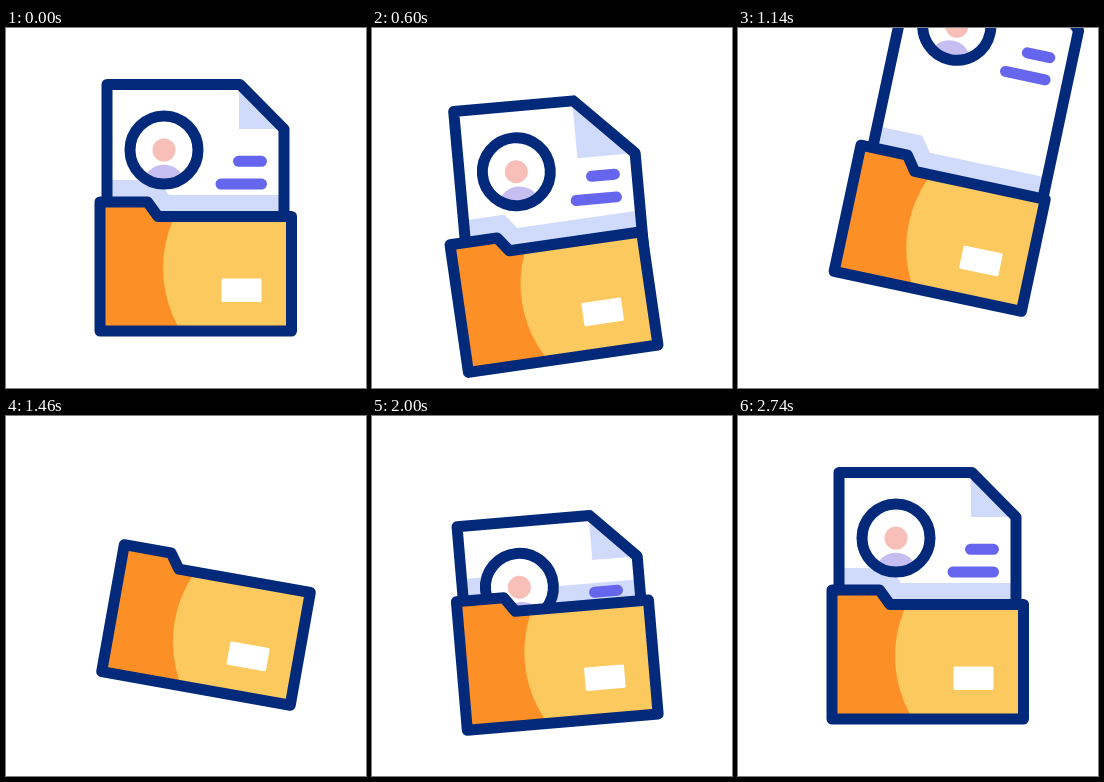
These frames come from a looping animation (360 by 360 pixels, 3 s). An HTML page:

```html
<!DOCTYPE html>
<html lang="en">
<head>
<meta charset="utf-8">
<title>Profile folder</title>
<style>
  html, body { margin: 0; width: 100%; height: 100%; overflow: hidden; background: #fff; }
  svg { display: block; width: 100vw; height: 100vh; }

  .ink { fill: none; stroke: #03297a; stroke-width: 11; stroke-linejoin: round; }
  .tint { fill: #d0dafb; }
  .line { stroke: #6665ee; stroke-width: 11; stroke-linecap: round; }

  .folder, .paper { transform-origin: 189.5px 303px; }
  .folder { animation: bob 3s infinite ease-in-out, tilt 3s infinite ease-in-out; }
  .paper { animation: slide 3s infinite ease-in-out, sway 3s infinite ease-in-out; }
  .sheet { animation: sheet 3s infinite ease-in-out; }
  .paper.sheet {
    animation: slide 3s infinite ease-in-out, sway 3s infinite ease-in-out, sheet 3s infinite ease-in-out;
  }
  .fold { animation: fold 3s infinite ease-in-out; }

  /* The folder dips, tosses the sheet out, then settles. */
  @keyframes bob {
    0%, 7.333% { translate: 0 0; }
    21.667% { translate: 1.5px 28.5px; }
    38.833% { translate: 0 -40px; }
    69.667% { translate: 1px 4px; }
    81.667%, 100% { translate: 0 0; }
  }
  @keyframes tilt {
    0%, 7.333% { rotate: 0deg; }
    24% { rotate: -9.3deg; }
    37.333% { rotate: 12deg; }
    43.333% { rotate: 12.8deg; }
    63.333% { rotate: -5.3deg; }
    80%, 100% { rotate: 0deg; }
  }

  /* The sheet moves relative to the folder. */
  @keyframes slide {
    0%, 7.333% { translate: 0 0; }
    21.333% { translate: 2.3px -9.5px; }
    31% { translate: 6.5px 10px; animation-timing-function: ease-in; }
    47.667% { translate: 0 -390px; animation-timing-function: step-start; }
    47.7% { translate: 0 140px; }
    59.167% { translate: 0 140px; animation-timing-function: ease-out; }
    77.333% { translate: 0 -25px; }
    91.333%, 100% { translate: 0 0; }
  }
  @keyframes sway {
    0%, 7.333% { rotate: 0deg; }
    20.667% { rotate: 3.1deg; }
    31.333% { rotate: -2.6deg; }
    38%, 100% { rotate: 0deg; }
  }
  @keyframes sheet {
    0%, 7.333%, 38.333%, 100% { d: path("M101 56.5H234L278 101V290H101Z"); }
    20.667% { d: path("M101 56.5H221L278 114V290H101Z"); }
    30.667% { d: path("M101 56.5H226L278 109V290H101Z"); }
  }
  @keyframes fold {
    0%, 7.333%, 38.333%, 100% { d: path("M233 56.5V101H278Z"); }
    20.667% { d: path("M220 56.5V114H278Z"); }
    30.667% { d: path("M225 56.5V109H278Z"); }
  }
</style>
</head>
<body>
<svg viewBox="0 0 360 360">
  <defs>
    <path id="case" d="M94 174H141.5L152 188.5H285.5V303H94Z"/>
    <clipPath id="front"><use href="#case"/></clipPath>
    <clipPath id="pocket"><path d="M-400 -700H800V300H-400Z"/></clipPath>
    <clipPath id="page"><path class="paper sheet" d="M101 56.5H234L278 101V290H101Z"/></clipPath>
  </defs>

  <g class="folder">
    <g clip-path="url(#pocket)">
      <g class="paper">
        <path class="sheet" fill="#fff" d="M101 56.5H234L278 101V290H101Z"/>
        <path class="fold tint" d="M233 56.5V101H278Z"/>
      </g>
      <g clip-path="url(#page)">
        <path class="tint" d="M60 152H152L163 167H320V300H60Z"/>
      </g>
      <g class="paper">
        <path class="sheet ink" d="M101 56.5H234L278 101V290H101Z"/>
        <circle cx="158" cy="122" r="34" fill="#fff"/>
        <path fill="#c6bdf1" d="M139 150A19.5 17 0 0 1 177 150A34 34 0 0 1 139 150Z"/>
        <circle cx="158" cy="122" r="11.5" fill="#f8beb8"/>
        <circle class="ink" cx="158" cy="122" r="34"/>
        <path class="line" d="M232.5 133.3H255.5M215 156H255.5"/>
      </g>
    </g>

    <g clip-path="url(#front)">
      <use href="#case" fill="#fc9026"/>
      <path fill="#fbc95e" d="M278 119A121 121 0 0 0 278 361H320V119Z"/>
    </g>
    <rect x="215.5" y="250.5" width="40" height="23.5" rx="1.5" fill="#fff"/>
    <use href="#case" class="ink"/>
  </g>
</svg>
</body>
</html>
```
